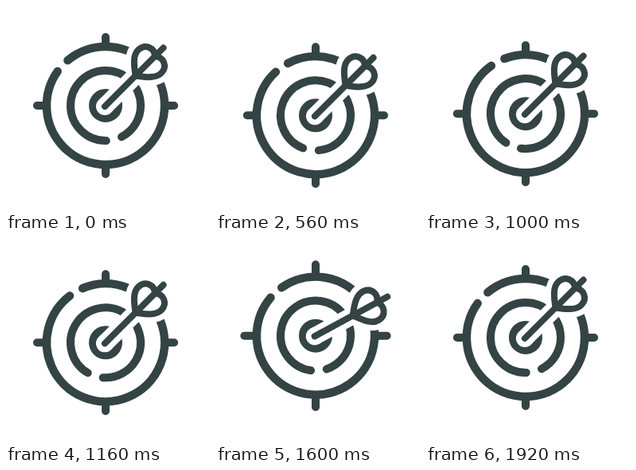
Recreate the animation shown at these times as an HTML page with a canvas. Size 256x256 px, loop 1960 ms.

```html
<!DOCTYPE html>
<html lang="en">
<head>
<meta charset="utf-8">
<title>Target and dart</title>
<style>
  html, body { margin: 0; width: 100%; height: 100%; overflow: hidden; background: #fff; }
  canvas { display: block; width: 100vw; height: 100vh; }
</style>
</head>
<body>
<canvas id="stage" width="256" height="256"></canvas>
<script>
const ctx = document.getElementById('stage').getContext('2d');
const LOOP = 1960, STEP = 40;
const INK = '#344344', PAPER = '#fff';
const CX = 125;
const rad = deg => deg * Math.PI / 180;

// Dart lies along +x with its tip at the origin
const fins = new Path2D(
  'M53 0C60 -9 68 -21 79 -20.5C90 -20 95 -8 87.5 0' +
  'C95 8 90 20 79 20.5C68 21 60 9 53 0Z');
const shaft = new Path2D('M-1.5 0H102.5');

function ease(t, from, to) {
  const p = Math.min(1, Math.max(0, (t - from) / (to - from)));
  return (1 - Math.cos(Math.PI * p)) / 2;
}

// Rises from 0 to 1 and falls back
function hump(t, from, to) {
  const mid = (from + to) / 2;
  return ease(t, from, mid) - ease(t, mid, to);
}

function ring(r, width, start, end) {
  ctx.lineWidth = width;
  ctx.beginPath();
  ctx.arc(0, 0, r, rad(start), rad(end));
  ctx.stroke();
}

function ticks(reach) {
  ctx.lineWidth = 10;
  ctx.beginPath();
  for (let i = 0; i < 4; i++) {
    const c = Math.cos(i * Math.PI / 2), s = Math.sin(i * Math.PI / 2);
    ctx.moveTo(c * 75, s * 75);
    ctx.lineTo(c * reach, s * reach);
  }
  ctx.stroke();
}

function dart(angle) {
  ctx.save();
  ctx.rotate(rad(angle));
  ctx.fillStyle = PAPER;
  for (const [color, width] of [[PAPER, 22], [INK, 8]]) {
    ctx.strokeStyle = color;
    ctx.lineWidth = width;
    ctx.fill(fins);
    ctx.stroke(fins);
    ctx.stroke(shaft);
  }
  ctx.restore();
}

function draw(t) {
  const y = 125 + 13 * ease(t, 0, 660) - 15.5 * ease(t, 740, 1660) + 2.5 * ease(t, 1660, 1940);
  const turn = hump(t, 0, 1920);

  ctx.fillStyle = PAPER;
  ctx.fillRect(0, 0, 256, 256);
  ctx.save();
  ctx.translate(CX, y);
  ctx.lineCap = ctx.lineJoin = 'round';
  ctx.strokeStyle = INK;

  ticks(86 + 4 * hump(t, 1280, 1800));
  const outer = 19 * turn, inner = 35 * turn;
  ring(74, 10.5, 230 + outer, 575.5 + outer);
  ring(44, 10, 89 + inner, 423 + inner);
  ring(16, 10, 0, 360);
  dart(-45 + 36 * hump(t, 1310, 1690));
  ctx.restore();
}

function tick() {
  const t = performance.now() % LOOP;
  draw(Math.floor(t / STEP) * STEP);
  requestAnimationFrame(tick);
}
tick();
</script>
</body>
</html>
```
